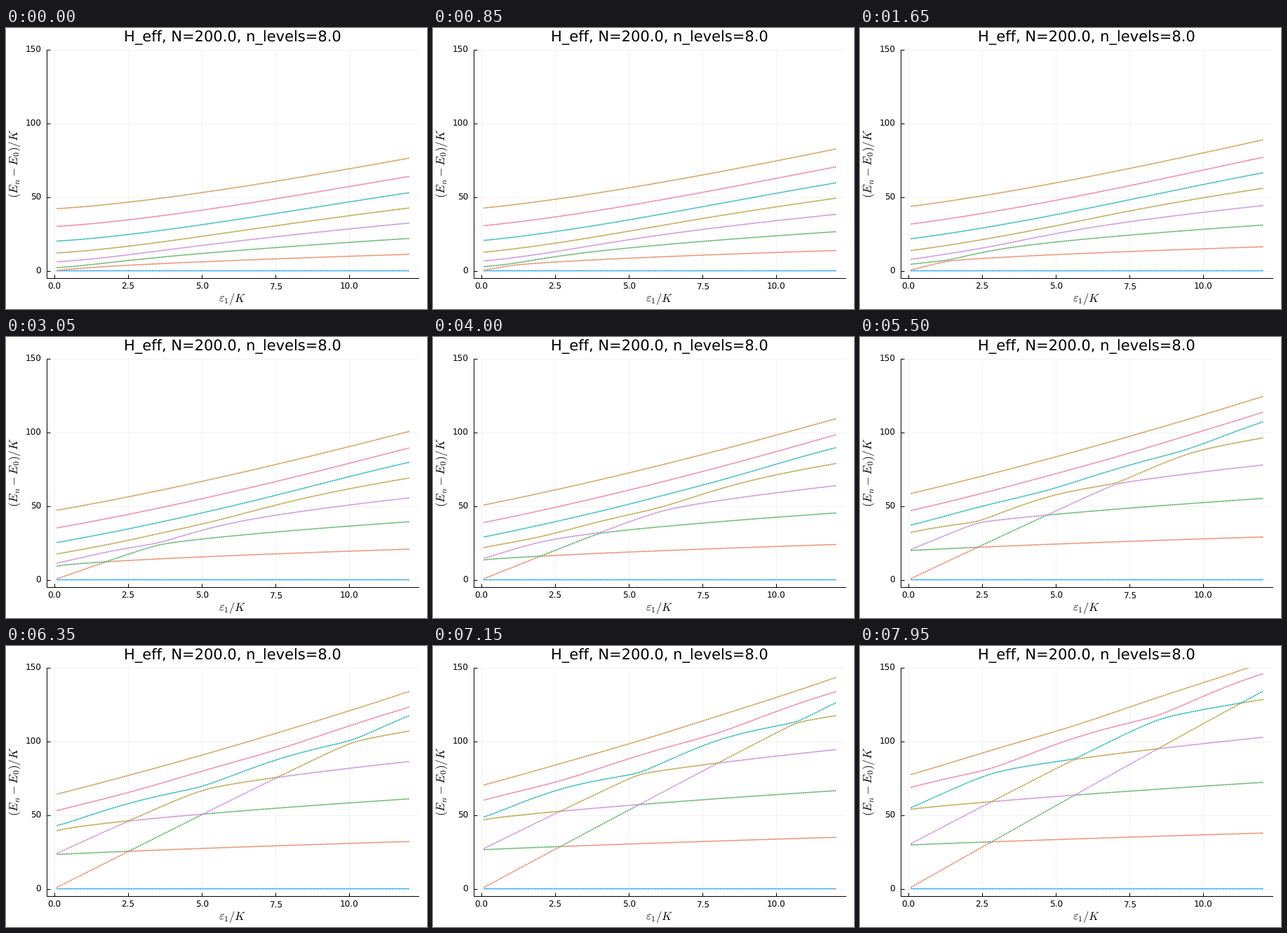
Recreate the animation shown at these times as a matplotlib script. Size 600 by 400 pixels, loop 8000 ms.

```python
import numpy as np
import matplotlib.pyplot as plt
from matplotlib.animation import FuncAnimation

W, H, DPI = 600, 400, 100
PT = 72 / DPI                      # points per pixel
FRAMES, STEP_MS = 160, 50

LEVELS, POINTS = 8, 200
DIM, KEEP, CHUNKS = 60, 20, 8
DRIVE_STEP = 0.05                  # squeezing drive added per frame

COLORS = ["#009afa", "#e36f47", "#3ea44e", "#c371d2",
          "#ac8e18", "#00aaae", "#ed5e93", "#c68225"]

plt.rcParams.update({
    "font.family": "DejaVu Sans",
    "mathtext.fontset": "cm",
    "text.hinting": "none",
})

# Kerr oscillator: a+^2 a^2 - e2 (a^2 + a+^2) - e1 (a + a+)
num = np.arange(DIM)
lower = np.diag(np.sqrt(num[1:]), 1)
kerr = np.diag(num * (num - 1.0))
pair = lower @ lower + (lower @ lower).T
shift = lower + lower.T

e1 = np.linspace(0.1, 12, POINTS)
chunks = e1.reshape(CHUNKS, -1)
mids = chunks.mean(axis=1)


def spectrum(e2):
    """Gaps above the ground state, shape (POINTS, LEVELS).

    Each chunk of e1 is solved in the low eigenstates of its midpoint.
    """
    full = kerr - e2 * pair - mids[:, None, None] * shift
    vals, vecs = np.linalg.eigh(full)
    vecs = vecs[:, :, :KEEP]
    x = vecs.transpose(0, 2, 1) @ shift @ vecs
    base = vals[:, :KEEP, None] * np.eye(KEEP)
    delta = (chunks - mids[:, None])[:, :, None, None]
    small = base[:, None] - delta * x[:, None]
    e = np.linalg.eigvalsh(small).reshape(POINTS, KEEP)[:, :LEVELS]
    return e - e[:, :1]


def dots(frame):
    gaps = spectrum(DRIVE_STEP * frame)
    return np.column_stack([np.tile(e1, LEVELS), gaps.T.ravel()])


paths = [dots(i) for i in range(FRAMES)]

fig = plt.figure(figsize=(W / DPI, H / DPI), dpi=DPI, facecolor="white")

LEFT, RIGHT, TOP, BOTTOM = 58.2, 588.5, 30.5, 356.0
ax = fig.add_axes([LEFT / W, 1 - BOTTOM / H,
                   (RIGHT - LEFT) / W, (BOTTOM - TOP) / H])
pad = 0.03 * (e1[-1] - e1[0])
ax.set_xlim(e1[0] - pad, e1[-1] + pad)
ax.set_ylim(-5, 150)
xticks, yticks = [0, 2.5, 5, 7.5, 10], [0, 50, 100, 150]
ax.set_xticks(xticks, [])
ax.set_yticks(yticks, [])
ax.tick_params(direction="in", length=5 * PT, width=PT)
ax.set_axisbelow(True)
ax.grid(color="0.945", lw=PT)
ax.spines[["top", "right"]].set_visible(False)
ax.spines[["left", "bottom"]].set_linewidth(PT)


def put(x, y, text, size, **kw):
    """Text with its baseline at a pixel position from the top left."""
    kw = {"ha": "center", "va": "baseline", **kw}
    fig.text(x / W, 1 - y / H, text, fontsize=size * PT, **kw)


def to_px(x, y):
    px, py = ax.transData.transform((x, y))
    return px, H - py


for t in xticks:
    put(to_px(t, 0)[0], 371.6, f"{t:.1f}", 12)
for t in yticks:
    put(50.3, to_px(0, t)[1] + 4.4, str(t), 12, ha="right")

put(323.2, 18.8, "H_eff, N=200.0, n_levels=8.0", 21)
put(323.2, 389.5, r"$\varepsilon_1/K$", 16.5)
put(16.5, 193.2, r"$(E_n-E_0)/K$", 17, rotation=90,
    rotation_mode="anchor")

cloud = ax.scatter(*paths[0].T, s=(1.9 * PT) ** 2, linewidths=0,
                   c=np.repeat(COLORS, POINTS), zorder=3)


def update(frame):
    cloud.set_offsets(paths[frame])
    return (cloud,)


anim = FuncAnimation(fig, update, frames=FRAMES, interval=STEP_MS,
                     repeat=True, repeat_delay=0)
plt.show()
```
